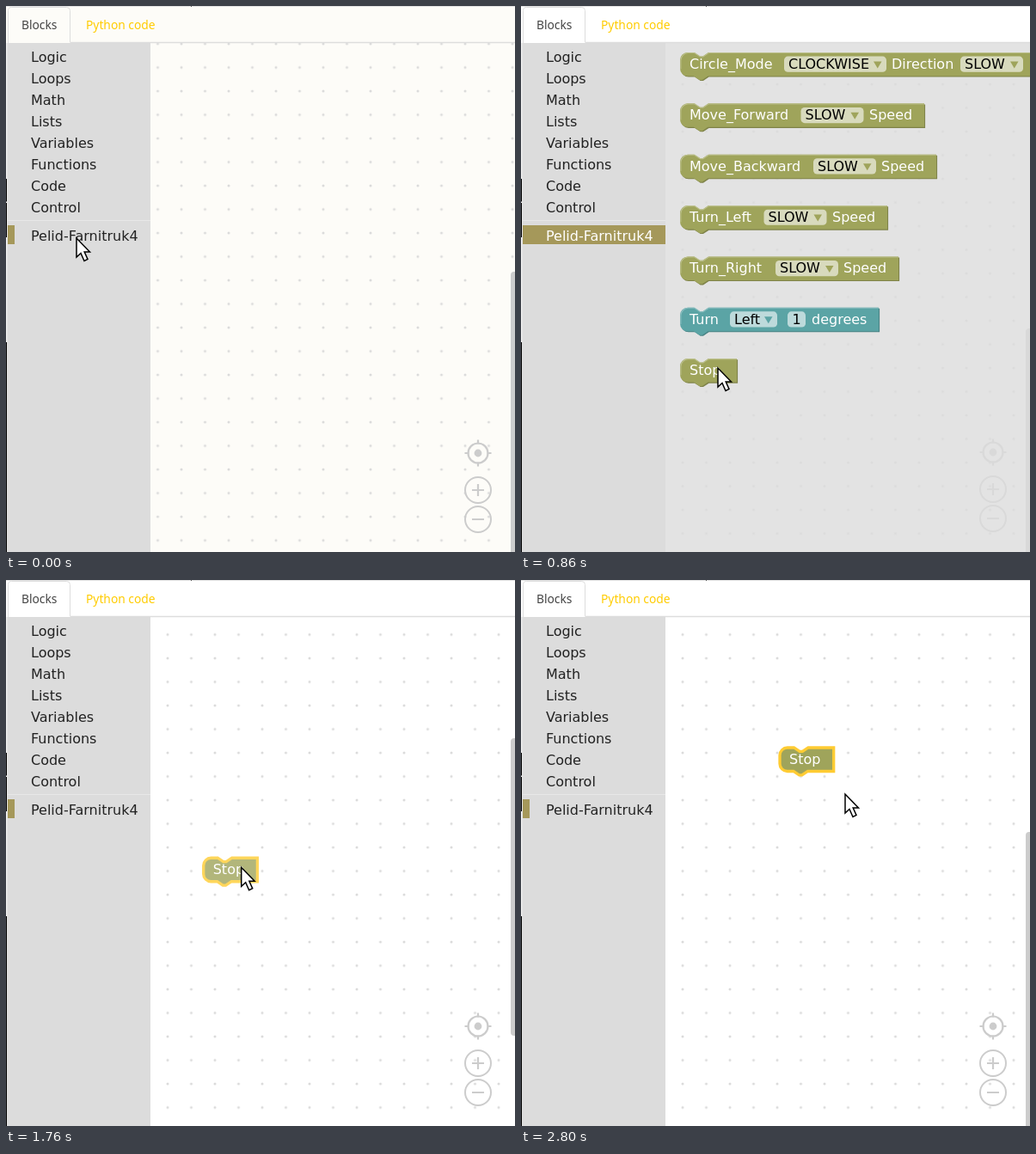
An HTML page for the animation above (3000 ms loop, 592x635 px).

```html
<!DOCTYPE html>
<html lang="en">
<head>
<meta charset="utf-8">
<title>Block editor</title>
<style>
html, body { margin: 0; width: 100%; height: 100%; overflow: hidden; background: #fff; }
svg { display: block; width: 592px; height: 635px; }
text { font: 16px "DejaVu Sans", sans-serif; fill: #fff; white-space: pre; }
.tab { font: 13.8px "Noto Sans", "Open Sans", sans-serif; }
.menu text { fill: #222; }
.icons { fill: none; stroke: #ccc; stroke-width: 2.2; }
</style>
</head>
<body>
<svg viewBox="0 0 592 635">
  <defs>
    <pattern id="dots" x="186" y="61.5" width="27.5" height="27.5" patternUnits="userSpaceOnUse">
      <circle cx="2" cy="2" r="1.5" fill="#dadada"/>
    </pattern>
  </defs>
  <rect id="page" width="592" height="635"/>
  <g id="grid"><rect x="140" y="20" width="480" height="640" fill="url(#dots)"/></g>
  <rect id="bar" x="587" width="10" rx="4" fill="#ccc"/>
  <g id="icons" class="icons">
    <circle cx="549" cy="519" r="11.5"/>
    <circle cx="549" cy="519" r="4.4" fill="#ccc" stroke="none"/>
    <path d="M549 503.500v5M549 529.500v5M533.500 519h5M559.500 519h5"/>
    <circle cx="549" cy="562" r="15" stroke-width="2"/>
    <circle cx="549" cy="596" r="15" stroke-width="2"/>
    <path d="M542 562h14M549 555v14M542 596h14"/>
  </g>
  <g id="flyout"></g>
  <g id="block"></g>

  <rect id="head" width="592" height="43"/>
  <path d="M0 .5H592" stroke="#e2e2e2"/>
  <rect x="215" width="1" height="1" fill="#555"/>
  <path d="M75 42.500H592" stroke="#ddd" stroke-width="1.6"/>
  <path d="M2.500 43V5.500a4 4 0 0 1 4-4H70.500a4 4 0 0 1 4 4V42.500" fill="none" stroke="#ddd"/>
  <text class="tab" x="18" y="27" style="fill:#444">Blocks</text>
  <text class="tab" x="93" y="27" style="fill:#fc0">Python code</text>

  <rect y="43" width="168" height="592" fill="#dcdcdc"/>
  <rect y="43" width="1.5" height="348" fill="#eee"/>
  <path d="M.5 201v26.500M.5 229v40M.5 391V635" stroke="#000"/>
  <path d="M2 249.500H168" stroke="#e8e8e8"/>
  <rect id="mark" x="2" y="255" height="22" fill="#a5985a"/>
  <g id="menu" class="menu"></g>
  <text id="robot" x="29" y="273">Pelid-Farnitruk4</text>

  <path id="arrow" d="M0 0V22L5 17.500 9 26.500 13 24.500 9.200 16H15.500Z" fill="#fff" stroke="#000" stroke-width="1.5"/>
  <path id="hand" d="M226 435L222 427Q222 424 225 426L224 421Q225 418 227 421V419Q229 417 230 420
    Q232 417 233 420Q236 418 236 422L238 423Q239 428 235 432V435Z
    M227.500 421v4M230.500 420v5M233.500 420v5" fill="#fff" stroke="#111" stroke-width="1.1"/>
</svg>
<script>
const $ = id => document.getElementById(id);
const set = (id, attrs) => { for (const k in attrs) $(id).setAttribute(k, attrs[k]); };
const show = (id, on) => set(id, { visibility: on ? 'visible' : 'hidden' });

const SCALE = 1.1, LEFT = 185, TOP = 54, PITCH = 59.35;
const OLIVE = { fill: '#9fa45b', dark: '#7f8349', light: '#bcc08c' };
const TEAL = { fill: '#5ba4a5', dark: '#498384', light: '#8cbfc0' };

const upper = w => `M0 8A8 8 0 0 1 8 0H15l6 4h3l6-4H${w}`;
const outline = w => upper(w) + 'v25H29.500l-6 4h-3l-6-4H8a8 8 0 0 1-8-8z';
const label = (x, s, fill = '#fff') => `<text x="${x}" y="19" style="fill:${fill}">${s}</text>`;

// A part is [x, text] for a label, or [x, text, width, hasArrow] for a field.
function part([x, s, w, hasArrow], color) {
  x -= LEFT;
  if (!w) return label(x, s);
  const arrow = hasArrow ? `<path d="M${x + w - 15} 10.500h9.500l-4.750 8z" fill="${color.fill}"/>` : '';
  return `<rect x="${x}" y="4.600" width="${w}" height="18.200" rx="4.400" fill="#fff" fill-opacity=".6"/>`
    + label(x + (hasArrow ? 5 : 5.5), s, '#000') + arrow;
}

function flyoutBlock([color, right, ...parts], i) {
  const w = (right - LEFT - 1) / SCALE;
  return `<g transform="translate(${LEFT} ${TOP + i * PITCH})"><g transform="scale(${SCALE})">
    <path d="${outline(w)}" transform="translate(1 1)" fill="${color.dark}"/>
    <path d="${outline(w)}" fill="${color.fill}"/>
    <path d="M.5 17V8${upper(w - .5).slice(4)}" transform="translate(.3 .5)" fill="none" stroke="${color.light}"/>
    </g>${parts.map(p => part(p, color)).join('')}</g>`;
}

const slow = x => [x, 'SLOW', 73, true];
const rows = [
  [OLIVE, 620, [196, 'Circle_Mode'], [306, 'CLOCKWISE', 119, true], [431, 'Direction'], slow(511)],
  [OLIVE, 470, [196, 'Move_Forward'], slow(325.500), [405, 'Speed']],
  [OLIVE, 484, [196, 'Move_Backward'], slow(340), [419, 'Speed']],
  [OLIVE, 427, [196, 'Turn_Left'], slow(282.500), [362, 'Speed']],
  [OLIVE, 440, [196, 'Turn_Right'], slow(296), [375, 'Speed']],
  [TEAL, 417, [196, 'Turn'], [243, 'Left', 55, true], [310, '1', 21, false], [338, 'degrees']],
  [OLIVE, 252, [196, 'Stop']]
];

$('flyout').innerHTML = '<rect x="168" y="43" width="424" height="592" fill="#ddd" fill-opacity=".8"/>'
  + rows.map(flyoutBlock).join('');
$('block').innerHTML = `<path d="${outline(57)}" transform="scale(${SCALE})"
  fill="${OLIVE.fill}" stroke="#fc3" stroke-width="3"/>` + label(11, 'Stop');
$('menu').innerHTML = ['Logic', 'Loops', 'Math', 'Lists', 'Variables', 'Functions', 'Code', 'Control']
  .map((s, i) => `<text x="29" y="${65 + 25 * i}">${s}</text>`).join('');

const linear = p => p;
const easeOut = p => 1 - (1 - p) ** 3;
const easeInOut = p => (1 - Math.cos(Math.PI * p)) / 2;

// Pointer moves: start time, end time, target x, target y, easing.
const moves = [
  [560, 860, 229, 421, easeOut],
  [1600, 1980, 347.5, 191, easeInOut],
  [2040, 2120, 345, 206, linear],
  [2140, 2380, 354, 222, easeInOut],
  [2660, 2800, 377, 249, easeOut]
];

function pointer(t) {
  let x = 82, y = 270;
  for (const [from, to, tx, ty, ease] of moves) {
    const p = ease(Math.min(1, Math.max(0, (t - from) / (to - from))));
    x += (tx - x) * p;
    y += (ty - y) * p;
  }
  return [x, y];
}

function scrollbar(t) {
  if (t < 260) return [309, 400];
  if (t < 1040) return [375, 400];
  return t < 2140 ? [184, 346] : [293, 400];
}

function draw(t) {
  const early = t < 260, open = !early && t < 1040, grabbed = t >= 1040 && t < 1080;
  const dragging = grabbed || t > 1600 && t < 2140;
  const bg = early ? '#fdfcf8' : '#fff';
  set('page', { fill: bg });
  set('head', { fill: bg });
  set('grid', { transform: early ? 'translate(16 8)' : '' });
  set('icons', { transform: early ? 'translate(0 1)' : '' });
  const [y, height] = scrollbar(t);
  set('bar', { y, height });
  set('mark', { width: open ? 166 : 8 });
  $('robot').style.fill = open ? '#fff' : '#222';
  show('flyout', open);
  show('block', t >= 1040);
  show('hand', grabbed);
  show('arrow', !grabbed);
  const [bx, by] = pointer(Math.min(2120, Math.max(1600, t)));
  set('block', { transform: `translate(${bx - 44} ${by - 11})`, opacity: dragging ? .8 : 1 });
  set('arrow', { transform: `translate(${pointer(t)})` });
}

const start = performance.now();
function tick() {
  const t = (performance.now() - start) % 3000;
  draw(Math.floor(t / 20) * 20);
  requestAnimationFrame(tick);
}
tick();
</script>
</body>
</html>
```
